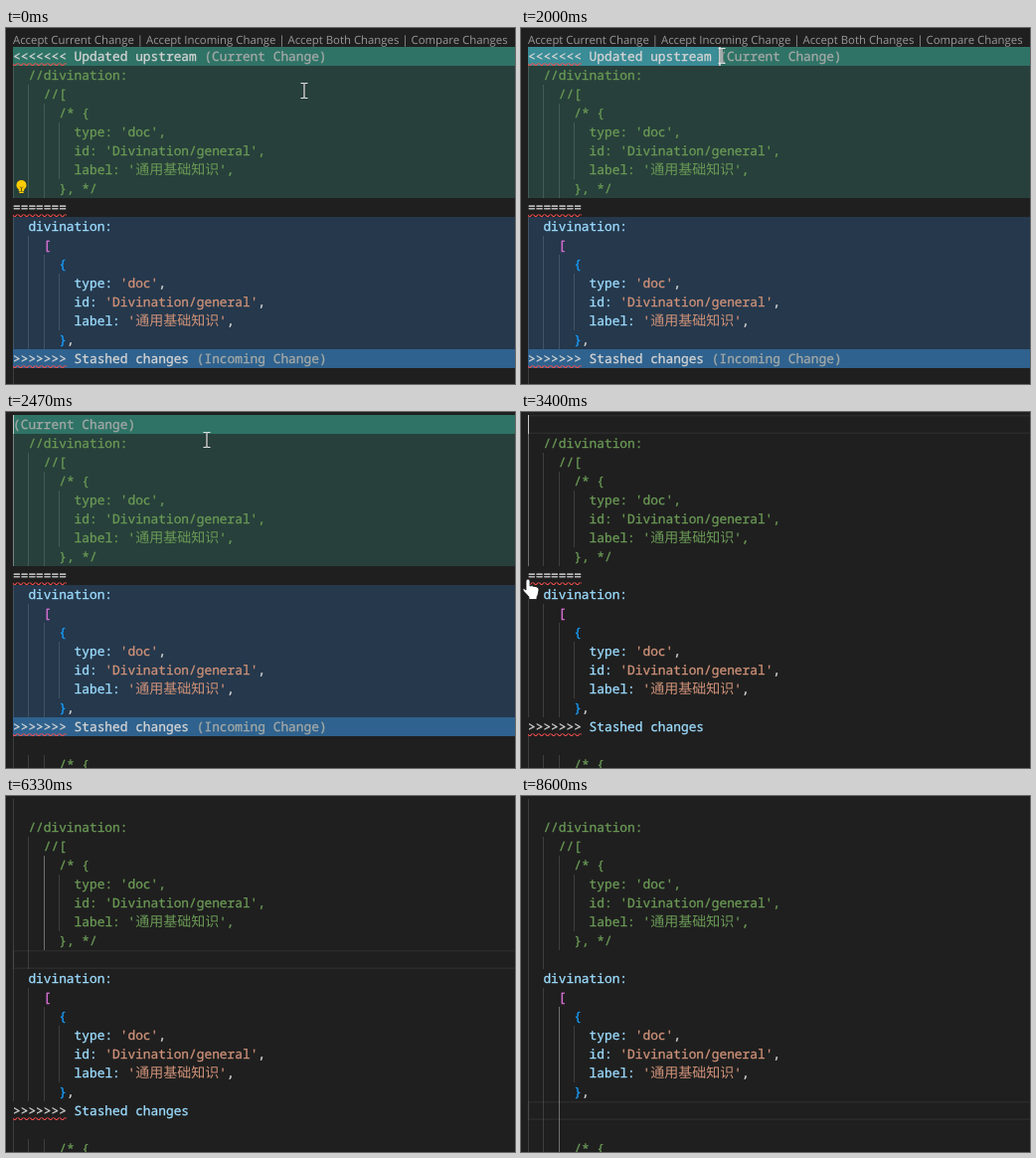
Animation, 512 px wide and 358 px high, one loop 8.67 s. Source, as an HTML page:

```html
<!DOCTYPE html>
<html lang="en">
<head>
<meta charset="utf-8">
<title>Resolving a merge conflict</title>
<style>
  html, body { margin: 0; width: 100%; height: 100%; overflow: hidden; background: #1f1f1f; }
  svg { display: block; }
  text {
    font: 12.83px "Noto Sans Mono", "DejaVu Sans Mono", monospace;
    color: #d4d4d4; white-space: pre; text-rendering: geometricPrecision;
  }
  text, tspan { fill: currentColor; stroke: currentColor; stroke-width: .3; }
  #lens { font: 11.37px "Open Sans", "Noto Sans", sans-serif; color: #999; stroke: none; }
  .cjk { font-family: "Noto Sans CJK SC", "Noto Sans CJK", sans-serif; font-size: 14px; stroke: none; }
  .comment { color: #6a9955; }
  .key { color: #9cdcfe; }
  .str { color: #ce9178; }
  .square { color: #da70d6; }
  .curly { color: #179fff; }
  .note { color: #a3a8a6; }
  .guide { fill: none; stroke: #fff; stroke-opacity: .14; }
  #active { stroke-opacity: .36; }
  #border { fill: none; stroke: #2b2b2b; stroke-width: 1.5; }
  #caret { fill: #c8c8c8; }
</style>
</head>
<body>
<svg width="512" height="358" viewBox="0 0 512 358">
  <defs>
    <pattern id="wave" width="6" height="3" patternUnits="userSpaceOnUse">
      <path fill="#f14c4c" d="M5.5 0 2.5 3H1.1L4.1 0zM4 0 6 2V.6L5.4 0zM0 2 1 3H2.4L0 .6z"/>
    </pattern>
  </defs>
  <text id="lens" x="7" y="16">Accept Current Change | Accept Incoming Change | Accept Both Changes | Compare Changes</text>
  <g id="editor">
    <g id="tint">
      <rect x="7" width="505" height="19" fill="#2f7366"/>
      <rect x="7" y="19" width="505" height="133" fill="#27403b"/>
      <rect x="7" y="171" width="505" height="133" fill="#25384c"/>
      <rect x="7" y="304" width="505" height="19" fill="#2f628e"/>
    </g>
    <rect id="border" x="7.5" width="520" height="17.5"/>
    <rect id="selection" x="7" height="19"/>
    <path id="guides" class="guide"/>
    <path id="active" class="guide"/>
    <g id="code"></g>
    <g id="bulb">
      <path fill="#fc0" d="M15.5 1a5 5 0 0 1 2.7 9.2V12h-5.4v-1.800A5 5 0 0 1 15.5 1z"/>
      <path fill="#fc0" d="M13.3 12.5h4.400v1.500h-4.400z"/>
      <path fill="none" stroke="#6b5a14" d="M14 7.5 15.5 9 17 7.5M15.5 9v3"/>
    </g>
    <rect id="caret" height="19"/>
  </g>
  <g id="mouse">
    <g id="beam" fill="none">
      <path stroke="#222" stroke-opacity=".5" stroke-width="2.6" d="M0-7V7"/>
      <path stroke="#e8e8e8" stroke-width="1.2" d="M-3.5-7.5H-1L0-6.700 1-7.5H3.5M0-7V7M-3.5 7.5H-1L0 6.700 1 7.5H3.5"/>
    </g>
    <path id="hand" fill="#fff" stroke="#111" stroke-width=".8"
      d="M0 0q2 0 2 2v5l2-.4 2 .8 2 .1 1.6 1q1.4.4 1.4 2.5l-1 5-1 2v2.5H1V18L-4.500 12q-1.500-2 .5-2.500L-2 11V2q0-2 2-2z"/>
  </g>
</svg>
<script>
const LOOP = 8670, ROW = 19, LEFT = 7, CHAR = 7.7;
const FIRST_CUT = 2270, UNTINT = 2600, SECOND_CUT = 4570, THIRD_CUT = 7470;
const $ = id => document.getElementById(id);
const svgEl = (tag, attrs, parent) => {
  const el = document.createElementNS('http://www.w3.org/2000/svg', tag);
  setAttrs(el, attrs);
  return parent.appendChild(el);
};
function setAttrs(el, attrs) {
  for (const k in attrs) el.setAttribute(k, attrs[k]);
}
const show = (el, on) => { el.style.display = on ? '' : 'none'; };
const within = (t, a, b) => t >= a && t < b;

// Each line: row, column, then [class, text] pieces.
function addLine(row, col, ...parts) {
  const el = svgEl('text', { x: LEFT + col * CHAR, y: row * ROW + 14 }, $('code'));
  return parts.map(([cls, str]) => {
    const span = svgEl('tspan', { class: cls }, el);
    span.textContent = str;
    return span;
  });
}
function addWave(row, cols) {
  return svgEl('rect', {
    width: cols * CHAR, height: 3, fill: 'url(#wave)',
    transform: `translate(${LEFT} ${row * ROW + 16})`
  }, $('code'));
}

const LABEL = '通用基础知识';
const [head, headNote] = addLine(0, 0, ['', '<<<<<<< Updated upstream '], ['note', '(Current Change)']);
addLine(1, 2, ['comment', '//divination:']);
addLine(2, 4, ['comment', '//[']);
addLine(3, 6, ['comment', '/* {']);
addLine(4, 8, ['comment', "type: 'doc',"]);
addLine(5, 8, ['comment', "id: 'Divination/general',"]);
addLine(6, 8, ['comment', "label: '"], ['comment cjk', LABEL], ['comment', "',"]);
addLine(7, 6, ['comment', '}, */']);
const [middle] = addLine(8, 0, ['', '=======']);
addLine(9, 2, ['key', 'divination:']);
addLine(10, 4, ['square', '[']);
addLine(11, 6, ['curly', '{']);
addLine(12, 8, ['key', 'type: '], ['str', "'doc'"], ['', ',']);
addLine(13, 8, ['key', 'id: '], ['str', "'Divination/general'"], ['', ',']);
addLine(14, 8, ['key', 'label: '], ['str', "'"], ['str cjk', LABEL], ['str', "'"], ['', ',']);
addLine(15, 6, ['curly', '}'], ['', ',']);
const [arrows, stash, tailNote] = addLine(16, 0, ['', '>>>>>>> '], ['', 'Stashed changes '], ['note', '(Incoming Change)']);
addLine(18, 6, ['comment', '/* {']);
const headWave = addWave(0, 7), middleWave = addWave(8, 7), tailWave = addWave(16, 7);

// Pointer path: time, x, y
const PATH = [
  [0, 300, 63], [70, 300, 63], [900, 10, 28], [1000, 8, 28], [1270, 92, 28],
  [1800, 202, 28], [2500, 202, 28], [3130, 7, 168], [3600, 7, 168], [3670, 12, 164],
  [3930, 9, 164], [4450, 79, 163], [4800, 79, 163], [5530, 3, 205], [5670, -8, 212],
  [6380, -8, 326], [6560, 8, 317], [6900, 221, 317], [LOOP, 221, 317]
];
function pointer(t) {
  const i = Math.max(1, PATH.findIndex(p => p[0] > t));
  const [t0, x0, y0] = PATH[i - 1], [t1, x1, y1] = PATH[i];
  const f = (t - t0) / (t1 - t0);
  return [x0 + (x1 - x0) * f, y0 + (y1 - y0) * f];
}

// Drags: start, cut time, row, columns, colour
const DRAGS = [
  [1000, FIRST_CUT, 0, 25, '#3a8c96'],
  [3930, SECOND_CUT, 8, 7, '#264f78'],
  [6570, THIRD_CUT, 16, 23, '#264f78']
];
// Blink phases: start, caret row, and the time it is lit
const BLINKS = [[1000, 0, 1800], [FIRST_CUT, 0, 2400], [3930, 8, 4450],
  [SECOND_CUT, 8, SECOND_CUT], [6570, 16, 6830], [THIRD_CUT, 16, THIRD_CUT]];

function guidePath(levels, keep) {
  let d = '';
  levels.forEach((n, row) => {
    for (let i = 0; i < n; i++)
      if (keep(i, row)) d += `M${LEFT + Math.round(i * 2 * CHAR) + .5} ${row * ROW}v${ROW}`;
  });
  return d;
}

function drawGuides(t) {
  const levels = [t < UNTINT ? 0 : 1, 1, 2, 3, 4, 4, 4, 3, t < SECOND_CUT ? 0 : 2,
    1, 2, 3, 4, 4, 4, 3, t < THIRD_CUT ? 0 : 3, t < THIRD_CUT ? 1 : 3, 3];
  const isActive = (i, row) =>
    within(t, FIRST_CUT, 3930) ? i === 0 && row > 0 && row < 8 :
    within(t, SECOND_CUT, 6570) ? i === 2 && row < 8 :
    t >= THIRD_CUT && i === 2 && row > 10;
  $('guides').setAttribute('d', guidePath(levels, (i, r) => !isActive(i, r)));
  $('active').setAttribute('d', guidePath(levels, isActive));
}

function drawCaret(t) {
  const drag = DRAGS.find(([a, b]) => within(t, a, b));
  let col = 0;
  if (drag) {
    const x = pointer(t - 50)[0];
    col = Math.max(0, Math.min(drag[3], Math.round((x - LEFT) / CHAR)));
    if (t < drag[0] + 50) col = 0;
    setAttrs($('selection'), { y: drag[2] * ROW, width: Math.round(col * CHAR), fill: drag[4] });
  }
  show($('selection'), drag && col > 0);

  const blink = BLINKS.filter(b => b[0] <= t).pop();
  const row = blink ? blink[1] : 0;
  const lit = blink && Math.floor(Math.max(0, t - blink[2]) / 500) % 2 === 0;
  show($('caret'), lit && t < 8600);
  // The caret straddles its column; the left edge hides half of it at column 0.
  const caretX = Math.max(LEFT, LEFT + Math.round(col * CHAR) - 1);
  setAttrs($('caret'), { x: caretX, y: row * ROW, width: col ? 2 : 1 });
  show($('border'), t >= UNTINT && col === 0);
  $('border').setAttribute('y', row * ROW + .75);
}

function drawBulb(t) {
  const row = t < 5070 ? 7 : 15;
  show($('bulb'), t < 2000 || within(t, 4650, 5070) || within(t, 7070, 7670));
  $('bulb').setAttribute('transform', `translate(0 ${row * ROW})`);
}

function drawPointer(t) {
  const [x, y] = pointer(t), hand = within(t, 3000, 3640);
  show($('mouse'), !within(t, 5670, 6380) && t < 7940);
  show($('hand'), hand);
  show($('beam'), !hand);
  $('mouse').setAttribute('transform', `translate(${x.toFixed(1)} ${y.toFixed(1)})`);
}

function draw(t) {
  const tinted = t < UNTINT;
  show($('lens'), t < FIRST_CUT);
  $('editor').setAttribute('transform', `translate(0 ${t < FIRST_CUT ? 19 : 3})`);
  show($('tint'), tinted);
  show(head, t < FIRST_CUT);
  show(headWave, t < FIRST_CUT);
  show(headNote, tinted);
  show(tailNote, tinted);
  show(middle, t < SECOND_CUT);
  show(middleWave, t < 4870);
  middleWave.setAttribute('width', t < SECOND_CUT ? 7 * CHAR : CHAR);
  stash.setAttribute('class', tinted ? '' : 'key');
  for (const el of [arrows, stash, tailWave]) show(el, t < THIRD_CUT);
  drawGuides(t);
  drawCaret(t);
  drawBulb(t);
  drawPointer(t);
}

const start = performance.now();
function tick() {
  draw((performance.now() - start) % LOOP);
  requestAnimationFrame(tick);
}
tick();
</script>
</body>
</html>
```
